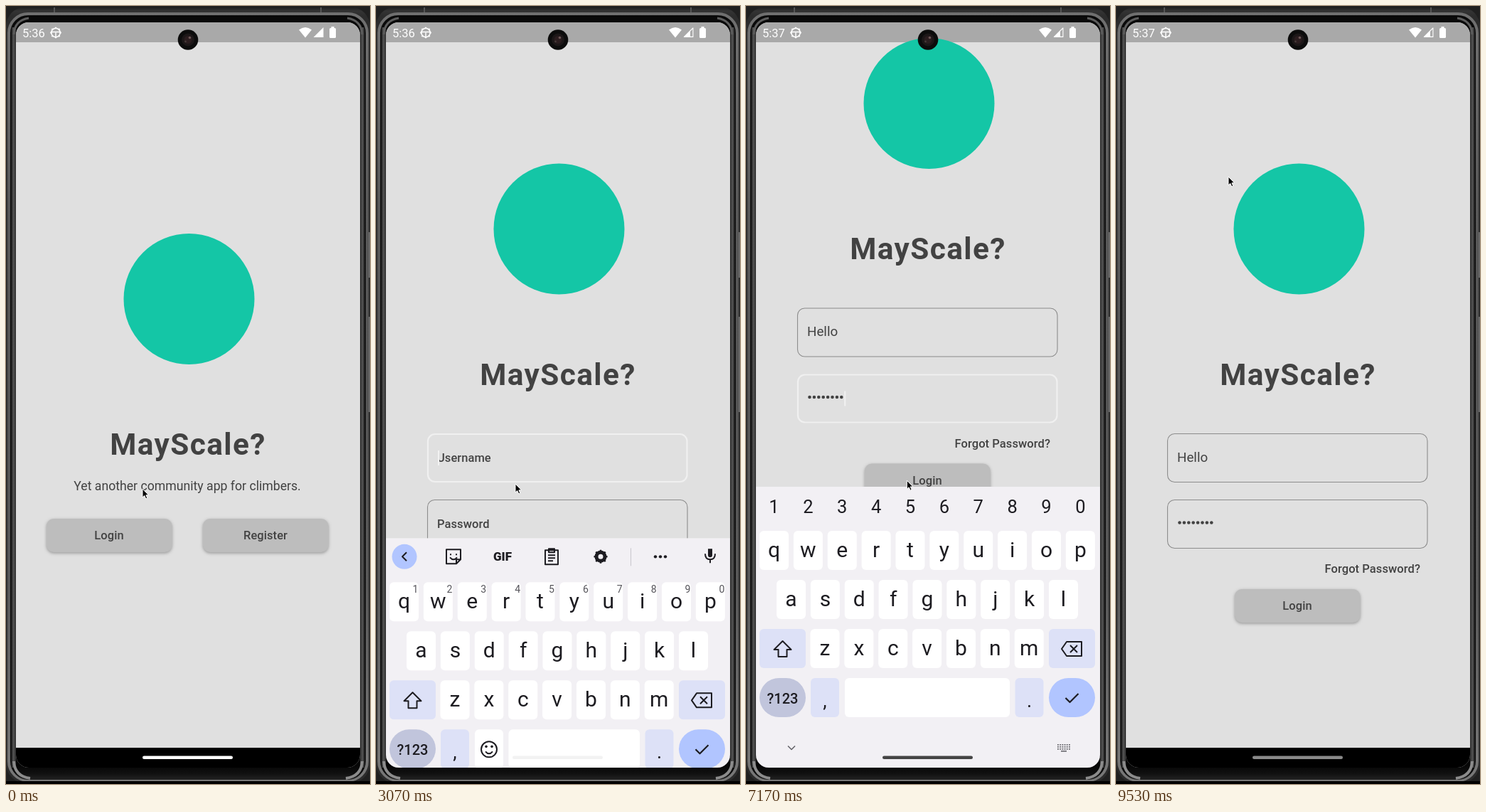
Animation, 512 px wide and 1094 px high, one loop 9610 ms. Source, as an HTML page with a canvas:

```html
<!DOCTYPE html>
<html lang="en">
<head>
<meta charset="utf-8">
<style>
html, body { margin: 0; width: 100%; height: 100%; overflow: hidden; background: #000; }
canvas { display: block; width: 512px; height: 1094px; }
</style>
</head>
<body>
<canvas id="stage"></canvas>
<script>
const canvas = document.getElementById('stage');
const ctx = canvas.getContext('2d');
const LOOP = 9610, W = 512, H = 1094;
const INK = '#424242', KEY_INK = '#1d1c21', BLUE = '#b1c5ff', PALE = '#dde1f7';
const LABEL = { weight: 500, spacing: 0.08 };
const scale = Math.max(1, window.devicePixelRatio || 1);
canvas.width = W * scale;
canvas.height = H * scale;

const clamp = v => Math.max(0, Math.min(1, v));
const ramp = (t, a, b) => clamp((t - a) / (b - a));
const smooth = u => u * u * (3 - 2 * u);
const easeOut = u => 1 - (1 - u) ** 3;
const mix = (a, b, u) => a + (b - a) * u;
const grey = v => `rgb(${v},${v},${v})`;

function box(x, y, w, h, r, fill, stroke, line = 1) {
  ctx.beginPath();
  ctx.roundRect(x, y, w, h, r);
  if (fill) { ctx.fillStyle = fill; ctx.fill(); }
  if (stroke) { ctx.strokeStyle = stroke; ctx.lineWidth = line; ctx.stroke(); }
}

function disc(x, y, r, fill) {
  ctx.beginPath();
  ctx.arc(x, y, r, 0, Math.PI * 2);
  ctx.fillStyle = fill;
  ctx.fill();
}

function text(s, x, y, size, { weight = 400, color = INK, align = 'left', spacing = 0 } = {}) {
  ctx.font = `${weight} ${size}px Roboto, sans-serif`;
  ctx.letterSpacing = spacing + 'px';
  ctx.textAlign = align;
  ctx.fillStyle = color;
  ctx.fillText(s, x, y);
}

// Icons are paths around their own centre.
function icon(d, x, y, { stroke = KEY_INK, line = 2, fill } = {}) {
  const path = new Path2D(d);
  ctx.save();
  ctx.translate(x, y);
  ctx.lineJoin = 'round';
  if (fill) { ctx.fillStyle = fill; ctx.fill(path); }
  if (stroke) { ctx.strokeStyle = stroke; ctx.lineWidth = line; ctx.stroke(path); }
  ctx.restore();
}

function gear(x, y, r, teeth, color, hole) {
  ctx.save();
  ctx.translate(x, y);
  ctx.strokeStyle = color;
  ctx.lineWidth = r * 0.3;
  for (let i = 0; i < teeth; i++) {
    ctx.rotate(Math.PI * 2 / teeth);
    ctx.beginPath();
    ctx.moveTo(0, r * 0.8);
    ctx.lineTo(0, r * 1.12);
    ctx.stroke();
  }
  ctx.lineWidth = hole;
  ctx.beginPath();
  ctx.arc(0, 0, r - hole / 2, 0, Math.PI * 2);
  ctx.stroke();
  ctx.restore();
}

function gradient(x0, y0, x1, y1, shades) {
  const g = ctx.createLinearGradient(x0, y0, x1, y1);
  shades.forEach((v, i) => g.addColorStop(i / (shades.length - 1), grey(v)));
  return g;
}

// Metal rail, then dark glass whose curved edges catch the light.
function drawPhone() {
  ctx.fillStyle = '#202020';
  ctx.fillRect(0, 0, W, H);
  box(0, 1, 512, 1092, 28, gradient(0, 0, 0, 14, [24, 52, 44]));
  for (const x of [67, 442]) {
    ctx.fillStyle = '#555';
    ctx.fillRect(x, 2, 2, 8);
  }
  box(4, 11, 504, 1078, 27, '#0a0a0a', gradient(0, 10, 0, 1090, [112, 88, 84, 88, 120]), 4);

  ctx.save();
  ctx.beginPath();
  ctx.roundRect(7, 14, 498, 1074, 24);
  ctx.clip();
  ctx.fillStyle = gradient(0, 1068, 0, 1090, [6, 16, 38]);
  ctx.fillRect(7, 1060, 498, 30);
  ctx.fillStyle = gradient(7, 0, 14, 0, [18, 84, 44]);
  ctx.fillRect(7, 30, 7, 1041);
  ctx.fillStyle = gradient(505, 0, 498, 0, [18, 84, 44]);
  ctx.fillRect(498, 30, 7, 1041);
  ctx.restore();

  icon('M11 1062Q12 1083 34 1086M501 1062Q500 1083 478 1086', 0, 0, { stroke: '#8c8c8c', line: 4 });
  icon('M11 40Q12 20 32 17M501 40Q500 20 480 17', 0, 0, { stroke: '#5c5c5c', line: 3 });
  ctx.fillStyle = '#000';
  ctx.fillRect(0, 1090, W, 4);
  ctx.fillStyle = '#666';
  ctx.fillRect(510, 318, 2, 64);
  ctx.fillRect(510, 437, 2, 134);
}

function drawStatus(t) {
  text(t > 5600 ? '5:37' : '5:36', 23, 43.5, 16.5, { color: '#fff' });
  gear(70, 37.5, 7, 8, '#fff', 1.6);
  icon('M-6-1H6M0 0V6', 70, 37.5, { stroke: '#fff', line: 1.5 });
  icon('M0 7L-9-4Q0-11 9-4Z', 421, 37.5, { stroke: null, fill: '#fff' });
  if (t < 1530) {
    icon('M-7 7L7-7V7Z', 439.5, 37, { stroke: null, fill: '#fff' });
  } else {
    icon('M-7 7L2.5-2.5V7Z', 439.5, 37, { stroke: null, fill: '#fff' });
    icon('M-6 6.4L6.4-6V6.4Z', 439.5, 37, { stroke: '#fff', line: 1.1 });
  }
  box(455, 31, 9, 14, 1.5, '#fff');
  ctx.fillRect(457.5, 29, 4, 3);
}

function drawCamera() {
  disc(256, 47.5, 14.3, '#0c0c0c');
  disc(256, 47.5, 9, '#1c1718');
  disc(256, 47.5, 5.5, '#2b1d1f');
  disc(258.5, 44.5, 1.8, '#6a5555');
  disc(252.5, 50, 1.4, '#453838');
}

function button(label, x, y) {
  ctx.save();
  ctx.shadowColor = 'rgba(0,0,0,.32)';
  ctx.shadowBlur = 4 * scale;
  ctx.shadowOffsetY = 1.5 * scale;
  box(x, y, 176.5, 47, 10, '#bdbdbd');
  ctx.restore();
  text(label, x + 88, y + 29, 16.48, { ...LABEL, align: 'center' });
}

function header(y) {
  disc(257.5, y, 92, '#14c6a6');
  text('MayScale?', 256, y + 219, 42.4, { weight: 700, align: 'center', spacing: 1.4 });
}

function drawWelcome() {
  header(412);
  text('Yet another community app for climbers.', 255, 681, 17.66, { align: 'center' });
  button('Login', 57, 721);
  button('Register', 277, 721);
}

function field(y, label, labelAlpha, focused) {
  if (focused) box(73, y + 1, 364.5, 67, 10, null, '#f0f0f0', 2.2);
  else box(72.5, y + 0.5, 365.5, 68, 10, null, '#8c8c8c', 1.1);
  if (labelAlpha > 0) {
    ctx.save();
    ctx.globalAlpha *= labelAlpha;
    text(label, 86, y + 39.5, 16.48, LABEL);
    ctx.restore();
  }
}

function caret(x, y) {
  ctx.fillStyle = '#f2f2f2';
  ctx.fillRect(x, y - 10, 2, 21);
}

const nameTimes = [3700, 3870, 4000, 4130, 4270];
const passTimes = [5430, 5530, 5640, 5770, 5930, 6030, 6100, 6270];
const typedCount = (times, t) => times.filter(k => t >= k).length;

function drawLogin(t) {
  const nameFocus = t >= 2790 && t < 4500;
  const passFocus = t >= 4500 && t < 8970;
  const name = 'Hello'.slice(0, typedCount(nameTimes, t));
  const dots = typedCount(passTimes, t);

  header(313.5);
  field(601, 'Username', 1 - ramp(t, 3735, 3900), nameFocus);
  field(694, 'Password', 1 - ramp(t, 5440, 5640), passFocus);
  if (name) {
    text(name, 86, 640.5, 18.8);
    const end = 86 + ctx.measureText(name).width;
    if (nameFocus) {
      ctx.fillStyle = INK;
      ctx.fillRect(86, 643, end - 86, 1.2);
      caret(end, 635);
    }
  } else if (nameFocus) caret(87, 635);

  for (let i = 0; i < dots; i++) disc(89.5 + 6.4 * i, 726.5, 2.3, INK);
  const blinkOff = t < 5370 ? t >= 4870 : t > 7370 && Math.floor((t - 7370) / 500) % 2 === 1;
  if (passFocus && !blinkOff) caret(87 + 6.4 * dots, 728);

  text('Forgot Password?', 428, 797, 16.48, { ...LABEL, align: 'right' });
  button('Login', 167, 820);
}

function suggestions(t) {
  const lists = [['H', 'Hey', 'How'], ['He', 'Hey', 'Her'], ['Hel', 'Help', 'Hello'],
    ['Hell', 'Hello', 'Hells'], ['Hello', 'Hellos', 'Help']];
  return lists[typedCount(nameTimes, t) - 1];
}

function toolbar(t, y) {
  const words = suggestions(t);
  disc(40, y + 26, 17.5, BLUE);
  icon(words ? 'M-3-6L3 0L-3 6' : 'M3-6L-3 0L3 6', 40, y + 26);
  icon('M-3-8H3V1Q3 4 0 4T-3 1Z', 470, y + 23, { stroke: null, fill: KEY_INK });
  icon('M-7-2Q-7 6 0 6T7-2M0 6V11', 470, y + 24);
  ctx.fillStyle = '#c8c6cc';
  if (words) {
    ctx.fillRect(186, y + 12, 1, 29);
    ctx.fillRect(323, y + 12, 1, 29);
    words.forEach((w, i) => text(w, 125 + 129 * i, y + 34, 19.5, { color: KEY_INK, align: 'center' }));
    return;
  }
  ctx.fillRect(358, y + 14, 1, 25);
  icon('M-10-10H10V4L4 10H-10ZM4 10V4H10M-5 1Q0 7 5 1M-4-4V-2M4-4V-2', 109, y + 26);
  text('GIF', 178, y + 32, 17, { weight: 800, color: KEY_INK, align: 'center' });
  icon('M-9-9H9V11H-9ZM-4-11H4V-6H-4ZM-5-2H5M-5 2H5M-5 6H2', 247, y + 26);
  gear(316, y + 26, 8.5, 8, KEY_INK, 5);
  for (const dx of [-7, 0, 7]) disc(400 + dx, y + 26, 2.2, KEY_INK);
}

function drawKeyboard(t, y) {
  const password = t >= 4470;
  const pitch = 47.87;
  ctx.fillStyle = '#f2f0f4';
  ctx.fillRect(14, y, 484, 420);
  const center = { color: KEY_INK, align: 'center' };

  if (password) [...'1234567890'].forEach((n, i) => text(n, 39.5 + pitch * i, y + 37, 25.5, center));
  else toolbar(t, y);

  const rows = [['qwertyuiop', 39.5, 62], ['asdfghjkl', 63.5, 131], ['zxcvbnm', 111, 200]];
  rows.forEach(([letters, x0, dy], row) => [...letters].forEach((c, i) => {
    const x = x0 + pitch * i;
    box(x - 20.5, y + dy, 41, 55, 6, '#fff');
    text(c, x, y + dy + 36.5, 30, center);
    if (row === 0 && !password) {
      text((i + 1) % 10, x + 16, y + dy + 14.5, 14, { color: '#55545a', align: 'center' });
    }
  }));

  box(19, y + 200, 65, 55, 6, PALE);
  box(426, y + 200, 65, 55, 6, PALE);
  icon('M0-11L12 1H6V11H-6V1H-12Z', 51.5, y + 228);
  icon('M-14 0L-7-10H14V10H-7ZM-2-5L8 5M8-5L-2 5', 458, y + 228);

  const low = y + 269;
  box(19, low, 65, 55, 27.5, '#c1c5dc');
  text('?123', 51.5, low + 35.5, 20, { weight: 500, ...center });
  box(91, low, 40, 55, 6, PALE);
  text(',', 111, low + 41, 27, center);
  if (password) box(139, low, 232, 55, 6, '#fff');
  else {
    box(139, low, 40, 55, 6, '#fff');
    box(186.5, low, 184.5, 55, 6, '#fff');
    icon('M11 0A11 11 0 1 1-11 0A11 11 0 1 1 11 0M-5 3Q0 9 5 3', 159, low + 28);
    disc(155, low + 24, 1.8, KEY_INK);
    disc(163, low + 24, 1.8, KEY_INK);
  }
  box(378.5, low, 40, 55, 6, PALE);
  text('.', 398.5, low + 41, 27, center);
  box(426, low, 65, 55, 27.5, BLUE);
  icon('M-9 0L-3 6L9-6', 458.5, low + 28, { line: 2.2 });

  icon('M-5-2.5L0 2.5L5-2.5', 64, y + 367, { stroke: '#66656b', line: 1.6 });
  ctx.fillStyle = '#66656b';
  for (let r = 0; r < 3; r++) {
    for (let c = 0; c < 6; c++) ctx.fillRect(438 + 3.2 * c, y + 362 + 3 * r, 1.9, 1.7);
  }
  ctx.fillRect(443, y + 371, 8, 1.6);
}

const route = [
  [0, 192, 679], [180, 90, 600], [330, 18, 500], [480, 120, 409], [680, 300, 520],
  [820, 330, 700], [970, 222, 790], [1200, 171, 744], [1830, 171, 744], [2150, 146, 672],
  [2600, 146, 672], [2780, 196, 672], [6620, 196, 672], [6780, 228, 657], [6930, 224, 668],
  [7150, 224, 668], [7450, 390, 610], [7900, 240, 672], [8060, 240, 672], [8570, 45, 1068],
  [8680, 50, 1080], [8800, 62, 1042], [8890, 62, 1042], [9100, 8, 850], [9180, 2, 720],
  [9400, 120, 310], [9520, 158, 240], [LOOP, 158, 240]
];

function drawPointer(t) {
  const i = route.findIndex(p => p[0] > t);
  const [t0, x0, y0] = route[i - 1], [t1, x1, y1] = route[i];
  const u = smooth(ramp(t, t0, t1));
  icon('M0 0V12L2.8 9.6L4.8 14L6.8 13L4.9 8.8H8.6Z', mix(x0, x1, u), mix(y0, y1, u),
    { stroke: '#fff', line: 1, fill: '#000' });
}

function pillShade(t) {
  if (t < 9130) return mix(255, 68, ramp(t, 3300, 4200));
  return mix(68, 138, ramp(t, 9130, 9530));
}

function draw(t) {
  ctx.setTransform(scale, 0, 0, scale, 0, 0);
  drawPhone();

  ctx.save();
  ctx.beginPath();
  ctx.roundRect(14, 23, 484, 1048, 18);
  ctx.clip();
  ctx.fillStyle = '#e0e0e0';
  ctx.fillRect(14, 23, 484, 1048);
  ctx.fillStyle = '#a9a9a9';
  ctx.fillRect(14, 23, 484, 28);

  const page = smooth(ramp(t, 1830, 2190));
  const lift = smooth(ramp(t, 3100, 3330)) - smooth(ramp(t, 8930, 9230));
  if (page < 1) {
    ctx.globalAlpha = 1 - page;
    drawWelcome();
  }
  if (page > 0) {
    ctx.save();
    ctx.globalAlpha = page;
    ctx.translate(0, 20 * (1 - page) - 176.5 * lift);
    drawLogin(t);
    ctx.restore();
  }
  ctx.globalAlpha = 1;

  ctx.fillStyle = '#000';
  ctx.fillRect(14, 1043, 484, 28);
  const shown = easeOut(ramp(t, 2950, 3230)) - smooth(ramp(t, 8870, 9130));
  if (shown > 0) drawKeyboard(t, 676 + 395 * (1 - shown));
  const overKeys = t > 2970 && t < 3300;
  box(192, 1054.5, 127, 4.5, 2.2, grey(overKeys ? 242 : Math.round(pillShade(t))));
  drawStatus(t);
  ctx.restore();

  drawCamera();
  drawPointer(t);
}

const start = performance.now();
function tick() {
  draw((performance.now() - start) % LOOP);
  requestAnimationFrame(tick);
}
tick();
</script>
</body>
</html>
```
